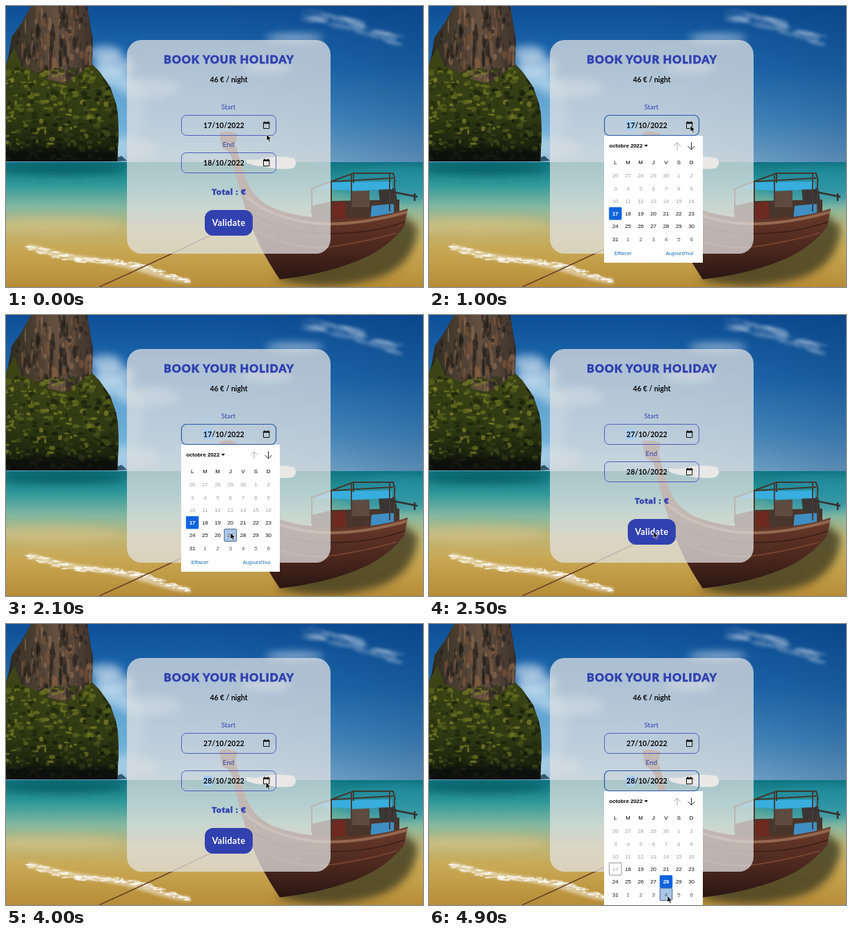
Write an HTML page that moves like this. It is 600 by 405 pixels and loops after 5000 ms.

```html
<!DOCTYPE html>
<html lang="en">
<head>
<meta charset="utf-8">
<title>Book your holiday</title>
<style>
  html, body { margin: 0; width: 100%; height: 100%; overflow: hidden; }
  svg { display: block; width: 600px; height: 405px; }
  text { text-anchor: middle; }
  .ui { font-family: Lato, "Open Sans", sans-serif; fill: #3141b0; }
  .ui .dark { fill: #08080a; font-size: 10.4px; font-weight: 700; }
  .ui .label { font-size: 9.8px; }
  .heavy { font-weight: 900; stroke: #3141b0; stroke-width: .45; }
  .cal { font: 8px "Liberation Sans", Arial, sans-serif; }
  .cal .link { fill: #1a6fb5; }
</style>
</head>
<body>
<svg viewBox="0 0 600 405" xmlns="http://www.w3.org/2000/svg">
  <defs>
    <linearGradient id="sky" x1="0" y1="0" x2="0" y2="1">
      <stop offset="0" stop-color="#0d4f98"/>
      <stop offset=".4" stop-color="#1f6db2"/>
      <stop offset=".75" stop-color="#4f95c8"/>
      <stop offset="1" stop-color="#86b6d5"/>
    </linearGradient>
    <linearGradient id="dusk">
      <stop offset=".5" stop-color="#08366f" stop-opacity="0"/>
      <stop offset="1" stop-color="#08366f" stop-opacity=".35"/>
    </linearGradient>
    <linearGradient id="sea" x1="0" y1="0" x2="0" y2="1">
      <stop offset="0" stop-color="#0f7583"/>
      <stop offset=".17" stop-color="#2c9799"/>
      <stop offset=".36" stop-color="#85b8a0"/>
      <stop offset=".52" stop-color="#c0b678"/>
      <stop offset=".7" stop-color="#c8a853"/>
      <stop offset="1" stop-color="#b78c37"/>
    </linearGradient>
    <linearGradient id="stone" x1="0" y1="0" x2="1" y2="0">
      <stop offset="0" stop-color="#2a281f"/>
      <stop offset=".45" stop-color="#65503f"/>
      <stop offset=".75" stop-color="#40342e"/>
    </linearGradient>
    <linearGradient id="bush" x1="0" y1="0" x2="0" y2="1">
      <stop offset="0" stop-color="#3f4617"/>
      <stop offset=".6" stop-color="#303a12"/>
      <stop offset="1" stop-color="#10150b"/>
    </linearGradient>
    <linearGradient id="hull" x1="0" y1="0" x2="0" y2="1">
      <stop offset="0" stop-color="#6f4b3c"/>
      <stop offset=".55" stop-color="#683a2a"/>
      <stop offset=".8" stop-color="#4a261c"/>
      <stop offset="1" stop-color="#2a1613"/>
    </linearGradient>
    <filter id="soft" x="-50%" y="-50%" width="200%" height="200%"><feGaussianBlur stdDeviation="6"/></filter>
    <filter id="mist" x="-20%" y="-50%" width="140%" height="200%"><feGaussianBlur stdDeviation="2.2"/></filter>
    <filter id="fine"><feGaussianBlur stdDeviation=".6"/></filter>
    <clipPath id="cliff"><path id="rock" d="M36 0H117L121 25 125 48 124 84 134 94 150 117 158 140 161 155 162 186 160 224H0V85L4 70 8 45 22 25Z"/></clipPath>
  </defs>

  <rect width="600" height="226" fill="url(#sky)"/>
  <rect width="600" height="226" fill="url(#dusk)"/>
  <g fill="#fff" filter="url(#soft)">
    <ellipse cx="150" cy="150" rx="50" ry="65" fill="#8cc8e8" opacity=".5"/>
    <ellipse cx="143" cy="68" rx="24" ry="11" opacity=".5"/>
    <ellipse cx="155" cy="86" rx="30" ry="14" opacity=".5"/>
    <ellipse cx="148" cy="106" rx="30" ry="12" opacity=".4"/>
    <ellipse cx="205" cy="118" rx="46" ry="14" opacity=".35"/>
    <ellipse cx="415" cy="46" rx="42" ry="6" opacity=".5"/>
    <ellipse cx="375" cy="88" rx="36" ry="8" opacity=".45"/>
    <ellipse cx="160" cy="205" rx="60" ry="16" opacity=".3"/>
  </g>
  <g id="wisps" fill="#fff" filter="url(#mist)"></g>

  <rect y="225" width="600" height="180" fill="url(#sea)"/>
  <g filter="url(#soft)">
    <ellipse cx="80" cy="235" rx="90" ry="9" fill="#0b5257" opacity=".6"/>
    <ellipse cx="560" cy="258" rx="80" ry="25" fill="#2390a8" opacity=".6"/>
    <ellipse cx="70" cy="315" rx="95" ry="12" fill="#d6c48a" opacity=".5"/>
    <path d="M388 394Q470 415 545 388 592 365 592 318L570 300 440 370Z" fill="#403d24" opacity=".8"/>
  </g>
  <path d="M35 347Q75 360 120 365T205 383 262 396" fill="none" stroke="#fff" stroke-width="7" stroke-linecap="round" filter="url(#mist)" opacity=".5"/>
  <g id="foam" fill="#fff" filter="url(#fine)"></g>

  <path d="M159 224V219L166 216 174 223Z" fill="#31576a"/>
  <use href="#rock" fill="url(#stone)"/>
  <g clip-path="url(#cliff)">
    <g id="cracks" filter="url(#fine)"></g>
    <path d="M0 82L12 60 22 86 40 94 62 106 88 112 106 96 124 84 170 130V226H0Z" fill="url(#bush)"/>
    <g id="leaves" filter="url(#fine)"></g>
    <rect x="-10" y="207" width="190" height="23" fill="#0b100b" opacity=".75" filter="url(#mist)"/>
  </g>

  <path d="M134 405Q225 364 318 319" fill="none" stroke="#6b4427" stroke-width="1.8"/>
  <g id="boat">
    <path d="M440 288L470 281 566 279V312H440Z" fill="#49352b"/>
    <path d="M470 284L488 282 490 306H468Z" fill="#6e2920"/>
    <path d="M497 267L523 266V290H497Z" fill="#5d4a40"/>
    <path d="M526 288L558 285V309L524 311Z" fill="#3f8fc4"/>
    <path d="M536 264L560 262 564 287 538 282Z" fill="#3a3634"/>
    <path d="M440 263L470 254 554 253 556 264 500 266Z" fill="#38aede"/>
    <path d="M438 264L500 241H557L560 253M500 241V255M470 253L557 248" fill="none" stroke="#40382f" stroke-width="2"/>
    <path d="M440 300V262M468 305V254M497 300V242M552 296V241M559 300V246" fill="none" stroke="#493b34" stroke-width="2"/>
    <path d="M552 267L592 275M588 270V281" fill="none" stroke="#35302f" stroke-width="2.5"/>
    <path d="M307 183Q316 178 333 184L330 199 341 236Q350 276 384 291 425 307 484 307 540 305 578 292L573 318Q552 345 520 361 470 385 394 394 380 374 366 347 342 297 326 222 322 208 311 205Z" fill="url(#hull)"/>
    <path d="M341 270Q370 301 430 311T577 297" fill="none" stroke="#94674f" stroke-width="4"/>
    <path d="M350 296Q395 327 460 328T574 311" fill="none" stroke="#3a1f18" stroke-width="1.5"/>
    <path d="M364 326Q420 355 475 346T562 327" fill="none" stroke="#74422f" stroke-width="2"/>
    <path d="M346 221Q360 223 374 219T414 219Q421 228 412 234 390 237 371 231 356 231 346 226Z" fill="#fffdf6"/>
  </g>

  <rect x="174" y="49" width="293" height="308" rx="21" fill="#e2e2e2" fill-opacity=".74"/>
  <g class="ui">
    <text class="heavy" x="321" y="83" font-size="16" letter-spacing=".95">BOOK YOUR HOLIDAY</text>
    <text class="dark" x="320.5" y="110.3">46 € / night</text>
    <text class="label" x="320" y="148.700">Start</text>
    <text class="label" x="320" y="202.500">End</text>
    <g id="fields"></g>
    <text class="heavy" x="321" y="272" font-size="12" letter-spacing=".85">Total : €</text>
    <rect x="286" y="294" width="69" height="37" rx="12"/>
    <text x="320.500" y="317" font-size="12.500" font-weight="700" letter-spacing=".4" style="fill:#fff">Validate</text>
  </g>

  <g id="popup" class="cal">
    <rect x="252" y="187" width="142" height="183" fill="#fff"/>
    <text x="283.2" y="204" font-weight="bold" font-size="7.8">octobre 2022</text>
    <path d="M309.7 200H315L312.3 203Z"/>
    <g fill="none" stroke-width="1">
      <path d="M357 207.5V197M352 202L357 197 362 202" stroke="#aaa"/>
      <path d="M377.5 196.5V207M372.5 202L377.5 207 382.5 202" stroke="#222"/>
    </g>
    <g id="days"></g>
    <text class="link" x="279" y="358.5">Effacer</text>
    <text class="link" x="360.3" y="358.5">Aujourd'hui</text>
  </g>
  <path id="cursor" d="M0 0V9.3L2.2 7.3 3.7 10.7 5.4 10 3.9 6.7H6.8Z" fill="#000" stroke="#fff" stroke-width=".7"/>
</svg>

<script>
const $ = id => document.getElementById(id);
const LOOP = 5000, STEP = 100;
const CELL = 18.25, LEFT = 259, TOP = 290 - 3 * CELL;
const FIRST = 21; // cell of 17 October

function add(parent, tag, attrs, text) {
  const el = document.createElementNS("http://www.w3.org/2000/svg", tag);
  set(el, attrs);
  if (text !== undefined) el.textContent = text;
  parent.append(el);
  return el;
}
function set(el, attrs) {
  for (const k in attrs) el.setAttribute(k, attrs[k]);
}
const show = (el, on) => { el.style.display = on ? "" : "none"; };

// Seeded texture for cliff, foam and clouds
let seed = 7;
const rnd = (a, b) => {
  seed = (seed * 16807) % 2147483647;
  return a + (b - a) * seed / 2147483647;
};
const pick = list => list[Math.floor(rnd(0, list.length))];
function scatter(id, count, make) {
  for (let i = 0; i < count; i++) add($(id), "ellipse", make());
}
scatter("cracks", 190, () => ({
  cx: rnd(0, 126), cy: rnd(0, 108), rx: rnd(.8, 3.5), ry: rnd(3, 13),
  fill: pick(["#1d1a17", "#8d6c52", "#4a3c32", "#241f1b", "#80573a", "#2f2a26"]), opacity: .6
}));
scatter("leaves", 420, () => {
  const x = rnd(0, 162), y = rnd(90, 222);
  const lit = y < 200 && x + y < rnd(170, 360);
  return {
    cx: x, cy: y, rx: rnd(1.5, 5.5), ry: rnd(1.2, 4),
    fill: pick(lit ? ["#737a22", "#1d250c", "#858529", "#2a3510", "#59641c"] : ["#161d0b", "#343f15", "#10160a", "#49521b"]),
    opacity: .65
  };
});
scatter("foam", 170, () => {
  const u = rnd(0, 1);
  return {
    cx: 30 + 235 * u, cy: 345 + 50 * u + 5 * Math.sin(u * 7) + rnd(-5, 5) * (1 - u * .5),
    rx: rnd(1.5, 7), ry: rnd(.5, 1.6), opacity: rnd(.2, .7)
  };
});
scatter("wisps", 45, () => {
  const u = rnd(0, 1), x = 430 + 130 * u, y = 12 + 32 * u + rnd(-10, 10);
  return { cx: x, cy: y, rx: rnd(6, 18), ry: rnd(1, 3.5), transform: `rotate(12 ${x} ${y})`, opacity: rnd(.08, .25) };
});

// Date inputs
function makeField(y) {
  const g = add($("fields"), "g", { transform: `translate(0 ${y})` });
  const box = add(g, "rect", { x: 252.5, y: .5, width: 136, height: 29, rx: 7, fill: "none" });
  const mark = add(g, "rect", { x: 284, y: 7.5, width: 13, height: 15, fill: "#a9cdf5" });
  const text = add(g, "text", { class: "dark", x: 313.5, y: 19, "letter-spacing": .1 });
  add(g, "path", { d: "M370.5 11H378.800V19.500H370.500Z", fill: "none", stroke: "#111" });
  add(g, "path", { d: "M370 10.500H379.300V12.800H370ZM371.700 9.300H373V11H371.700ZM376.300 9.300H377.600V11H376.300Z", fill: "#111" });
  return (day, focus, open) => {
    text.textContent = day + "/10/2022";
    show(mark, focus);
    set(box, { stroke: open ? "#2b58a8" : "#4453bd", "stroke-width": open ? 1.2 : .9 });
  };
}
const startField = makeField(157), endField = makeField(211);

// Month grid
const midX = c => LEFT + CELL * (c + .5);
[..."LMMJVSD"].forEach((d, c) => add($("days"), "text", { x: midX(c), y: 228.2 }, d));
const cells = Array.from({ length: 42 }, (_, i) => {
  const x = LEFT + CELL * (i % 7), y = TOP + CELL * Math.floor(i / 7);
  const label = i < 5 ? 26 + i : i < 36 ? i - 4 : i - 35;
  return {
    box: add($("days"), "rect", { x: x + .3, y: y + .3, width: CELL - .6, height: CELL - .6, rx: 1 }),
    text: add($("days"), "text", { x: x + CELL / 2, y: y + CELL / 2 + 2.9 }, label)
  };
});

function drawPopup(shift, chosen, min, [px, py]) {
  set($("popup"), { transform: `translate(0 ${shift})` });
  const col = Math.floor((px - LEFT) / CELL), row = Math.floor((py - shift - TOP) / CELL);
  const over = col >= 0 && col < 7 && row >= 0 && row < 6 ? row * 7 + col : -1;
  cells.forEach(({ box, text }, i) => {
    const picked = i === chosen, hot = i === over && i >= min && !picked, today = i === FIRST && !picked;
    show(box, picked || hot || today);
    set(box, {
      fill: picked ? "#0f63dc" : hot ? "#a9c6e8" : "none",
      stroke: picked ? "#0f63dc" : hot ? "#26476f" : "#777",
      "stroke-width": .8
    });
    set(text, {
      fill: picked ? "#fff" : i < min ? "#a2a2a2" : i > 35 || hot ? "#555" : "#111",
      "font-weight": picked ? "bold" : "normal"
    });
  });
}

// Pointer path: time, x, y
const path = [
  [0, 375, 185], [400, 376, 172], [1100, 376, 172], [1600, 304, 300], [1800, 304, 300],
  [2100, 323, 314], [2500, 323, 312], [2800, 323, 312], [3300, 332.5, 240],
  [3700, 374, 228], [4200, 374, 228], [4800, 343, 392], [LOOP, 343, 392]
];
function pointer(t) {
  const i = path.findIndex(p => p[0] > t);
  const [t0, x0, y0] = path[i - 1], [t1, x1, y1] = path[i];
  const u = (t - t0) / (t1 - t0), e = u * u * (3 - 2 * u);
  return [x0 + (x1 - x0) * e, y0 + (y1 - y0) * e];
}

function draw(t) {
  const at = pointer(t);
  const openStart = t >= 600 && t < 2200, openEnd = t >= 4100;
  const changed = t >= 2200;
  startField(changed ? 27 : 17, t >= 600 && t < 3900, openStart);
  endField(changed ? 28 : 18, t >= 3900, openEnd);
  show($("popup"), openStart || openEnd);
  if (openStart) drawPopup(0, FIRST, FIRST, at);
  if (openEnd) drawPopup(54, FIRST + 11, FIRST + 1, at);
  set($("cursor"), { transform: `translate(${at})` });
}

const begin = performance.now();
let last = -1;
function tick() {
  const t = Math.floor((performance.now() - begin) % LOOP / STEP) * STEP;
  if (t !== last) draw(last = t);
  requestAnimationFrame(tick);
}
tick();
</script>
</body>
</html>
```
